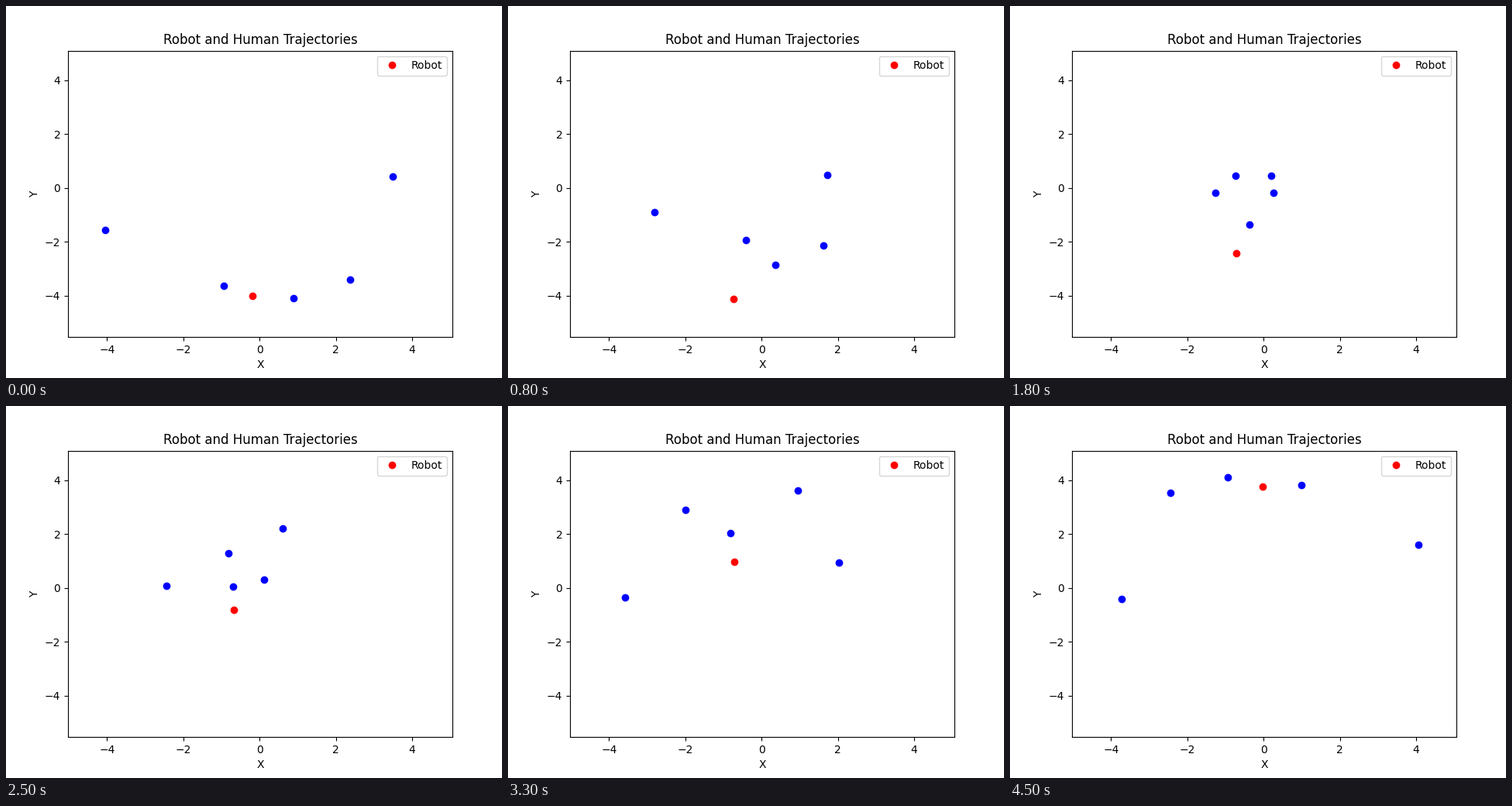
A matplotlib script that plays this animation: 640 px wide and 480 px high, repeating every 4600 ms.

```python
import numpy as np
import matplotlib.pyplot as plt
from matplotlib.animation import FuncAnimation

FRAMES, INTERVAL = 46, 100
STEP = 0.25            # time step of the crowd, in seconds
MEET, FREE = 8, 25     # frames where walkers start to swerve and get clear

# Each walker crosses from the point opposite its goal: place at MEET, at FREE, goal.
WALKERS = [
    [(-2.807, -0.895), (0.120, 0.314), (4.195, 1.652)],
    [(1.726, 0.486), (-2.441, 0.083), (-3.721, -0.406)],
    [(-0.408, -1.931), (0.608, 2.213), (0.994, 3.824)],
    [(0.364, -2.852), (-0.693, 0.055), (-0.947, 4.239)],
    [(1.624, -2.132), (-0.815, 1.292), (-2.455, 3.557)],
]
ROBOT = {
    0: (-0.185, -4), 4: (-0.551, -4.521), 8: (-0.734, -4.118),
    18: (-0.713, -2.420), 25: (-0.673, -0.809), 29: (-0.957, 0.141),
    37: (-0.327, 1.810), 46: (0, 4),
}


def smooth(t, keys, end_speed=None):
    """Cubic Hermite curve through {time: point}."""
    times = np.array(list(keys), float)
    points = np.array(list(keys.values()), float)
    slopes = np.gradient(points, times, axis=0)
    if end_speed is not None:
        slopes[-1] = end_speed
    i = np.clip(np.searchsorted(times, t, side="right") - 1, 0, len(times) - 2)
    h = (times[i + 1] - times[i])[:, None]
    u = (t - times[i])[:, None] / h
    return ((1 + 2 * u) * (1 - u) ** 2 * points[i]
            + u * (1 - u) ** 2 * h * slopes[i]
            + u ** 2 * (3 - 2 * u) * points[i + 1]
            + u ** 2 * (u - 1) * h * slopes[i + 1])


def toward(goal, place):
    """One step at unit speed, slowing down within one unit of the goal."""
    gap = goal - place
    return STEP * gap / max(1, np.hypot(*gap))


def walk(meet, free, goal):
    meet, free, goal = map(np.array, (meet, free, goal))
    keys = {-1: -goal, MEET: meet, FREE: free}
    path = list(smooth(np.arange(FREE + 1), keys, toward(goal, free)))
    while len(path) < FRAMES:
        path.append(path[-1] + toward(goal, path[-1]))
    return path


humans = np.array([walk(*w) for w in WALKERS])
robot = smooth(np.arange(FRAMES), ROBOT)

fig, ax = plt.subplots(figsize=(6.4, 4.8), dpi=100)
ax.set_xlim(-5.024, 5.057)
ax.set_ylim(-5.534, 5.102)
ax.set_title("Robot and Human Trajectories")
ax.set_xlabel("X")
ax.set_ylabel("Y")

robot_dot, = ax.plot([], [], "ro", label="Robot")
human_dots, = ax.plot([], [], "bo")
ax.legend(loc="upper right")


def update(i):
    robot_dot.set_data(robot[i:i + 1].T)
    human_dots.set_data(humans[:, i].T)
    return robot_dot, human_dots


anim = FuncAnimation(fig, update, frames=FRAMES, interval=INTERVAL,
                     repeat=True, repeat_delay=0)
plt.show()
```
